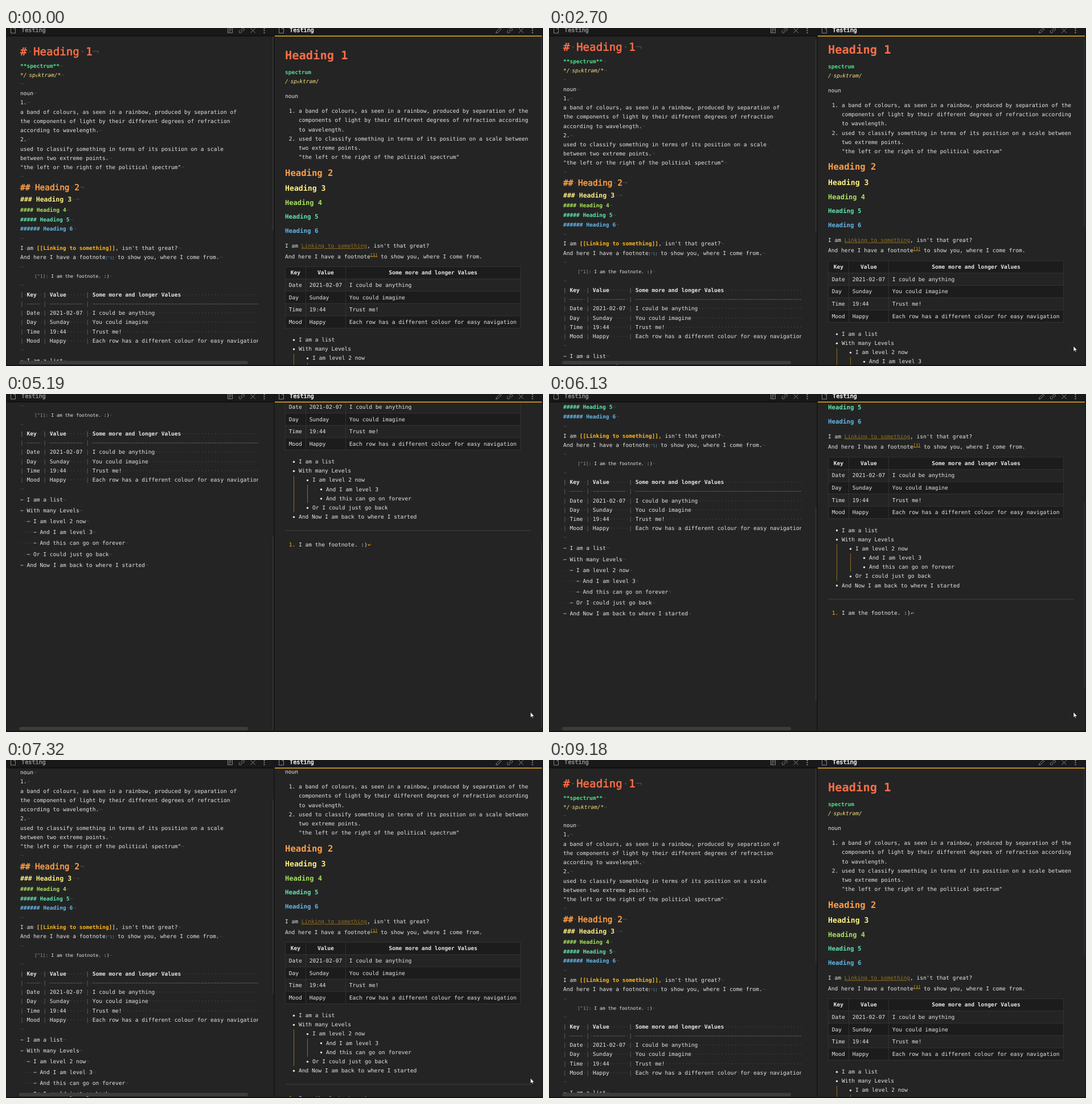
Animation, 943 px wide and 594 px high, one loop 9260 ms. Source, as an HTML page:

```html
<!DOCTYPE html>
<html lang="en">
<head>
<meta charset="utf-8">
<title>Note editor and preview</title>
<style>
  html, body { margin: 0; width: 100%; height: 100%; overflow: hidden; background: #242424; }
  svg { display: block; width: 943px; height: 594px; }
  text {
    font-family: "DejaVu Sans Mono", "Noto Sans Mono", monospace;
    white-space: pre; text-rendering: geometricPrecision; color: #e6e6e6;
  }
  text, tspan { fill: currentColor; }
  .b { font-weight: 700; }
  .semi { stroke: currentColor; stroke-width: .6; }
  .i { font-style: italic; }
  .mid { text-anchor: middle; }
  .h1 { color: #fb6f48; } .h2 { color: #fb9e48; } .h3 { color: #fdf083; }
  .h4 { color: #a5e35c; } .h5 { color: #5fe3ad; } .h6 { color: #62b6e8; }
  .green { color: #50e08c; }
  .ipa { color: #f3e27e; }
  .amber { color: #fdb51e; }
  .link { color: #91701f; text-decoration: underline; }
  .ref { color: #f0a91c; text-decoration: underline; }
  .tag { color: #6f9cc0; }
  .label { color: #9c948c; }
  .bar { color: #696969; }
  .dim { color: #858585; }
  .dot { color: #484848; font-weight: 400; font-style: normal; stroke: none; }
  .icon { fill: none; stroke: #858585; stroke-width: 1; }
</style>
</head>
<body>
<svg viewBox="0 0 943 594" xmlns="http://www.w3.org/2000/svg">
  <defs>
    <clipPath id="clipL"><rect x="1" y="15" width="442" height="577"/></clipPath>
    <clipPath id="clipR"><rect x="472" y="15" width="468" height="577"/></clipPath>
    <path id="doc" d="M.5 -2H5.5L8.5 1V9H.5ZM5.5 -2V1H8.5"/>
    <path id="chain" d="M4 6L7 3M4.5 2.5L6.3 .8A2.2 2.2 0 0 1 9.4 3.9L7.6 5.7M6 6.5L4.2 8.2A2.2 2.2 0 0 1 1.1 5.1L2.9 3.4"/>
    <path id="cross" d="M.5 .5L8.5 8.5M8.5 .5L.5 8.5"/>
    <path id="more" d="M0 0V2M0 3.6V5.6M0 7.2V9.2" stroke-width="2"/>
  </defs>
  <rect width="943" height="594" fill="#242424"/>
  <g clip-path="url(#clipL)"><g id="left"></g></g>
  <g clip-path="url(#clipR)"><g id="right"></g></g>

  <rect x="23" y="585" width="402" height="6" rx="3" fill="#3d3d3d"/>
  <rect id="thumbL" x="468" y="15" width="1.6" height="340" fill="#363636"/>
  <rect id="thumbR" x="939.5" y="15" width="1.5" height="328" fill="#333"/>

  <rect width="943" height="14" fill="#191919"/>
  <rect y="13" width="470" height="1.5" fill="#0d0d0d"/>
  <rect x="472" y="13.4" width="469" height="1.6" fill="#dfa41b"/>
  <path d="M.5 0V594M942 0V594" stroke="#161616"/>
  <path d="M471 0V594" stroke="#171717" stroke-width="2"/>
  <path d="M0 593H943" stroke="#141414" stroke-width="2"/>
  <g class="icon">
    <use href="#doc" x="8"/><use href="#doc" x="479"/>
    <path d="M389.5 -1V8.5H397.5V-1M391 1.5H396M391 4H396M391 6.3H394"/>
    <path d="M860.5 9L861.3 6L867.5 -.2L869.7 2L863.5 8.2Z"/>
    <use href="#chain" x="408.5"/><use href="#chain" x="879.5"/>
    <use href="#cross" x="429"/><use href="#cross" x="900"/>
    <use href="#more" x="453.5"/><use href="#more" x="924.5"/>
  </g>
  <text class="semi dim" x="27" y="7" font-size="10.2">Testing</text>
  <text class="semi" x="498" y="7" font-size="10.2">Testing</text>
  <path id="cursor" d="M0 0V9.6L2.2 7.6L3.6 11L5 10.4L3.6 7.2H6.6Z" fill="#fff" stroke="#111" stroke-width=".7"/>
</svg>
<script>
const $ = id => document.getElementById(id);
const SIZE = 9.57;
const CHAR = SIZE * 0.602;
const left = $("left"), right = $("right");

// y is the middle of the capitals
const text = (x, y, body, cls = "", size = SIZE) =>
  `<text x="${x}" y="${y + size * 0.365}" font-size="${size}" class="${cls}">${body}</text>`;
const span = (body, cls, size = SIZE) => `<tspan class="${cls}" font-size="${size}">${body}</tspan>`;
const rect = (x, y, w, h, fill) => `<rect x="${x}" y="${y}" width="${w}" height="${h}" fill="${fill}"/>`;

// Editor text shows its spaces as dots and its line ends as a mark
const dots = s => s.replace(/ +/g, m => `<tspan class="dot">${"·".repeat(m.length)}</tspan>`);
const END = '<tspan class="dot">¬</tspan>';
const ipa = s => s.replace("ˈ", '<tspan font-size="6">ˈ</tspan>').replace("ɛ", '<tspan font-size="7">ɛ</tspan>');

const rows = [
  ["Key", "Value", "Some more and longer Values"],
  ["Date", "2021-02-07", "I could be anything"],
  ["Day", "Sunday", "You could imagine"],
  ["Time", "19:44", "Trust me!"],
  ["Mood", "Happy", "Each row has a different colour for easy navigation"]
];
const items = [
  [0, "I am a list"], [0, "With many Levels"], [1, "I am level 2 now"],
  [2, "And I am level 3"], [2, "And this can go on forever"],
  [1, "Or I could just go back"], [0, "And Now I am back to where I started"]
];

function buildEditor() {
  const out = [];
  const put = (y, body, cls, size) => out.push(text(25, y, body, cls, size));
  const plain = (y, s, end = END) => put(y, dots(s) + end);

  put(41, dots("# Heading 1") + END, "semi h1", 19.15);
  put(66.3, "**spectrum**" + END, "b green");
  put(82.5, ipa("*/ˈspɛktrəm/*") + END, "i ipa");
  plain(115, "noun");
  plain(131, "1.");
  plain(147.2, "a band of colours, as seen in a rainbow, produced by separation of ", "");
  plain(163.5, "the components of light by their different degrees of refraction ", "");
  plain(179.8, "according to wavelength.");
  plain(196, "2.");
  plain(212.2, "used to classify something in terms of its position on a scale ", "");
  plain(228.4, "between two extreme points.");
  plain(244.6, '"the left or the right of the political spectrum"');
  put(279.3, dots("## Heading 2") + END, "semi h2", 14.36);
  put(301.3, dots("### Heading 3 ") + END, "b h3", 11.5);
  [4, 5, 6].forEach((n, k) =>
    put(319.6 + k * 16.7, dots("#".repeat(n) + " Heading " + n) + END, "b h" + n));
  [98, 260.5, 370, 419.2, 452, 565.5].forEach(y => plain(y, ""));

  put(386.6, dots("I am ") + span(dots("[[Linking to something]]"), "b amber") +
    dots(", isn't that great?") + END);
  put(403, dots("And here I have a footnote") + span("[^1]", "tag", 6.4) +
    dots(" to show you, where I come from.") + END);
  out.push(text(50, 435.7, span("[^1]:", "label", 8.1) + dots(" I am the footnote. :)") + END, "", 8.1));

  const bar = '<tspan class="bar">|</tspan>';
  const row = (cells, pad) => bar + dots(` ${cells[0].padEnd(4, pad)} `) + bar +
    dots(` ${cells[1].padEnd(10, pad)} `) + bar + dots(` ${cells[2].padEnd(52, pad)}`);
  rows.forEach((cells, k) => put(468.3 + (k ? k + 1 : 0) * 16.2, row(cells, " "), k ? "" : "b"));
  put(484.5, row(["", "", ""], "−"), "bar");

  items.forEach(([depth, s], k) => plain(584.5 + k * 19.05, "  ".repeat(depth) + "− " + s));
  left.innerHTML = out.join("");
}

function buildPreview() {
  const out = [];
  const put = (x, y, body, cls, size) => out.push(text(x, y, body, cls, size));

  put(490, 48, "Heading 1", "b h1", 20.4);
  put(490, 77.6, "spectrum", "b green");
  put(490, 94, ipa("/ˈspɛktrəm/"), "i ipa");
  put(490, 120, "noun");
  put(496.7, 145.7, "1.");
  put(496.7, 194.3, "2.");
  [
    "a band of colours, as seen in a rainbow, produced by separation of the",
    "components of light by their different degrees of refraction according",
    "to wavelength.",
    "used to classify something in terms of its position on a scale between",
    "two extreme points.",
    '"the left or the right of the political spectrum"'
  ].forEach((s, k) => put(514, 145.7 + k * 16.2, s));
  [[254, 15.6], [281, 13.2], [306.5, 12], [331.2, 10.8], [356.4, 10.8]].forEach(([y, size], k) =>
    put(490, y, "Heading " + (k + 2), "b h" + (k + 2), size));

  put(490, 382.6, "I am " + span("Linking to something", "link") + ", isn't that great?");
  put(490, 401.2, "And here I have a footnote");
  put(490 + 26 * CHAR, 398, "[1]", "ref", 6.9);
  put(652.2, 401.2, " to show you, where I come from.");

  const top = 419, step = 21.6;
  rows.forEach((cells, k) => {
    const y = top + k * step;
    out.push(rect(490, y, 413.5, step, k === 1 || k === 3 ? "#242424" : "#1c1c1c"));
    cells.forEach((s, c) => k
      ? put([496.8, 532.8, 602.8][c], y + 10.9, s)
      : put([508.3, 561.5, 750][c], y + 10.9, s, "b mid"));
  });
  for (let k = 0; k <= 5; k++) out.push(rect(490, top + k * step, 413.5, 0.9, "#353535"));
  [490, 526, 596, 903].forEach(x => out.push(rect(x, top, 0.9, step * 5 + 0.9, "#353535")));

  items.forEach(([depth, s], k) => {
    const y = 547.6 + k * 16.17;
    out.push(`<circle cx="${505.5 + depth * 24}" cy="${y + 0.7}" r="1.7" fill="#e6e6e6"/>`);
    put(514 + depth * 24, y, s);
  });
  out.push(rect(505, 572.5, 1, 64, "#8f6f22"), rect(529, 588.5, 1, 32, "#8f6f22"));
  out.push(rect(490, 668.5, 432, 1, "#404040"));
  put(496.7, 693.4, span("1.", "amber") + " I am the footnote. :)" + span("↩", "amber"));
  right.innerHTML = out.join("");
}

// Tracks: start, time per step, value of each step
const scrolls = [
  [0, 80, [0]],
  [2700, 80, [10.2, 50, 95, 126, 135]],
  [3320, 80, [152, 228, 311.5, 350, 360]],
  [3940, 80, [372, 402, 432, 439]],
  [5190, 80, [429, 391, 348, 325, 319]],
  [6130, 85, [308.5, 245, 190]],
  [6760, 80, [186, 178, 167, 153, 138, 122, 109, 99, 95]],
  [7780, 77.5, [87, 60, 25, 4, 0]]
];
const AWAY = [918, 600];
const pointer = [
  [0, 80, [AWAY]],
  [360, 75, [[917, 590], [925, 586], [935, 588]]],
  [750, 76, [[933, 584], [926, 580], [916, 578], [919, 576]]],
  [1140, 78, [575, 573, 570, 567, 563, 560, 559].map((y, k) => [919 + k / 3, y])],
  [8560, 78, [[921, 561], [920, 567], [919, 575], [919, 583], [918, 590], AWAY]],
  [9180, 80, [[920, 593]]]
];
const at = (track, t) => {
  const [start, step, values] = track.filter(s => s[0] <= t).pop();
  return values[Math.min(values.length - 1, Math.floor((t - start) / step))];
};

// The editor follows the preview by matching places in the note
const pairs = [[0, 0], [10.2, 7.7], [99, 93], [135, 134], [308.5, 313.5],
  [311.5, 315.5], [360, 361], [429, 398.7], [439, 406]];
const follow = r => {
  const k = Math.max(1, pairs.findIndex(p => p[0] >= r));
  const [[r0, l0], [r1, l1]] = [pairs[k - 1], pairs[k]];
  return l0 + (l1 - l0) * (r - r0) / (r1 - r0);
};

const move = (node, x, y) => node.setAttribute("transform", `translate(${x} ${y})`);

function draw() {
  const t = performance.now() % 9260;
  const r = at(scrolls, t), l = follow(r);
  move(left, 0, -l);
  move(right, 0, -r);
  move($("thumbL"), 0, l * 0.589);
  move($("thumbR"), 0, r * 0.567);
  move($("cursor"), ...at(pointer, t));
  requestAnimationFrame(draw);
}

buildEditor();
buildPreview();
draw();
</script>
</body>
</html>
```
